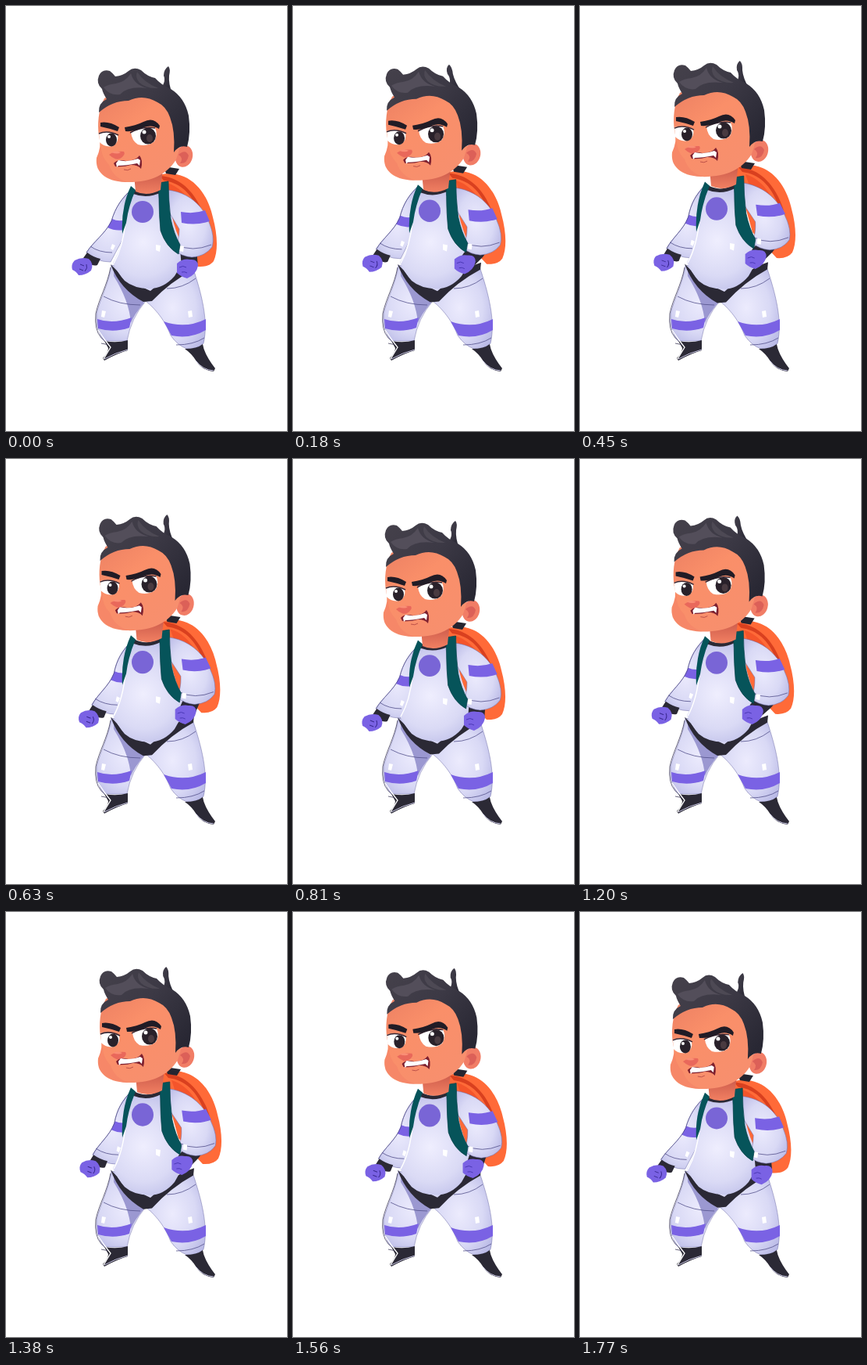
An HTML page that plays this animation: 360 by 543 pixels, repeating every 1.8 s.

```html
<!DOCTYPE html>
<html lang="en">
<head>
<meta charset="utf-8">
<title>Breathing astronaut</title>
<style>
  html, body { margin: 0; width: 100%; height: 100%; overflow: hidden; background: #fff; }
  svg { display: block; width: 100%; height: 100%; }
  .dark { fill: #2b2935; }
  .violet { fill: #7a62e4; }
  .suit { fill: url(#suit); stroke: #6b68a4; stroke-width: .5; }
  .belly { fill: url(#belly); }
  .teal { fill: #06545a; }
  .seam { fill: none; stroke: #55528c; stroke-width: .8; }
  .glint { fill: #fff; }
</style>
</head>
<body>
<svg viewBox="0 0 360 543">
  <defs>
    <radialGradient id="suit" cx=".45" cy=".5" r=".65">
      <stop offset="0" stop-color="#ecebfd"/><stop offset=".6" stop-color="#d9d9f5"/><stop offset="1" stop-color="#b9b9e6"/>
    </radialGradient>
    <radialGradient id="belly" gradientUnits="userSpaceOnUse" cx="176" cy="302" r="78">
      <stop offset="0" stop-color="#efeefe"/><stop offset=".55" stop-color="#dadaf5"/><stop offset="1" stop-color="#b6b7e5"/>
    </radialGradient>
    <linearGradient id="skin" x1="0" y1="0" x2=".7" y2="1">
      <stop offset="0" stop-color="#ea7e62"/><stop offset=".45" stop-color="#fa8f69"/><stop offset="1" stop-color="#f78f6e"/>
    </linearGradient>
    <linearGradient id="hair" x1="0" y1="0" x2="1" y2=".8">
      <stop offset="0" stop-color="#45414b"/><stop offset=".5" stop-color="#3c3945"/><stop offset="1" stop-color="#282733"/>
    </linearGradient>
    <linearGradient id="neck" x2="0" y2="1">
      <stop offset="0" stop-color="#bd4d43"/><stop offset="1" stop-color="#f28062"/>
    </linearGradient>
  </defs>

  <g id="pack">
    <path fill="#ff6a38" d="M192 218Q208 210 228 218C247 226 260 247 265 270C271 292 272 313 266 326Q260 334 246 333L215 300Z"/>
    <path fill="#d9401f" d="M197 217C222 218 244 237 255 272L249 268C239 240 224 226 202 223Z"/>
    <path fill="#f4552b" d="M206 226C224 231 238 248 246 270L222 272Z"/>
  </g>

  <!-- legs -->
  <path class="suit" d="M135 331C132 354 121 373 116 393Q114 414 126 428L155 428Q160 399 179 377L200 345Z"/>
  <path fill="#9b98d1" d="M138 337Q153 362 177 379Q165 393 160 405Q158 377 138 345Z"/>
  <path class="suit" d="M179 377C195 390 205 405 211 421Q220 434 232 438Q247 438 253 431C260 402 250 366 239 333Q207 343 179 377Z"/>
  <path class="violet" d="M117 400Q137 407 161 398L158 411Q138 418 118 412Z"/>
  <path class="violet" d="M202 403Q230 413 256 400L256 414Q236 426 212 421Z"/>
  <path class="seam" d="M125 371Q145 382 172 382M206 361Q226 361 243 348M218 433Q240 433 254 424"/>
  <path class="dark" d="M126 428Q142 431 156 427L156 440Q142 444 126 453L124 450Q131 443 131 437Z"/>
  <path class="dark" d="M229 438Q245 438 252 432Q254 445 268 463L266 467Q252 466 244 454Q238 444 229 438Z"/>
  <path fill="none" stroke="#cac8e5" d="M126 451Q140 443 156 439M243 453Q252 465 266 466"/>
  <path fill="none" stroke="#44405f" stroke-width=".8" d="M134 334C130 356 119 374 115 393Q113 414 122 424L132 433L122 431"/>
  <path fill="none" stroke="#fff" stroke-width="1.3" d="M118 414L127 427L134 436L125 451"/>
  <path class="glint" d="M123 389l5 1-2 8-4-1zM233 390l5-1 1 8-5 1z"/>

  <g id="armL">
    <path class="suit" d="M160 235C149 245 140 257 135 275C127 291 112 301 103 315Q115 327 134 327L151 295L166 250Z"/>
    <path class="violet" d="M136 272Q144 276 154 273L151 286Q140 288 130 283Z"/>
    <path class="seam" d="M160 235C149 245 140 257 135 275C127 291 112 301 103 315M108 307Q119 315 136 315"/>
    <path class="dark" d="M104 315Q112 321 121 323L117 331Q109 334 99 322Z"/>
    <path class="violet" d="M88 325Q97 320 106 323Q113 329 109 338Q102 344 93 344Q90 339 85 337Q83 330 88 325Z"/>
    <path fill="none" stroke="#38288f" d="M95 330l5 2M94 336l5 2M103 330q2 5-2 9"/>
    <path class="glint" d="M136 304l4 2-3 6-3-2z"/>
  </g>

  <g id="torso">
    <path class="dark" d="M134 330Q143 338 150 348L185 364L212 342Q225 333 241 328L240 337Q211 352 187 377L176 378Q146 362 134 330Z"/>
    <path class="belly" d="M160 236Q180 247 200 235Q211 240 213 270Q217 287 225 304Q229 326 216 345Q202 361 184 361Q164 361 152 351Q143 341 137 328Q149 308 151 277Q153 250 160 236Z"/>
    <path fill="none" stroke="#fff" stroke-width="1.4" d="M153 276Q150 308 138 329"/>
    <path class="dark" d="M163 234Q181 244 199 232L199 238Q181 247 163 240Z"/>
    <circle cx="175" cy="263" r="14" fill="#7965d6"/>
    <path class="glint" d="M192 305l6 1-1 8-5-2z"/>
    <path class="teal" d="M160 230L166 235Q157 255 154 277L149 291Q147 257 160 230Z"/>
  </g>

  <line id="cuff" stroke="#2b2935" stroke-width="21" stroke-linecap="round"/>
  <g id="armR">
    <path class="suit" d="M207 235C234 238 252 255 260 276Q268 295 264 308Q255 320 238 321Q225 320 216 312Q222 300 222 285L207 260Z"/>
    <path class="violet" d="M224 263Q241 266 255 261L261 275Q244 281 225 277Z"/>
    <path class="seam" d="M219 305Q238 315 263 305"/>
    <path class="glint" d="M223 306l5 1-1 7-5-1z"/>
  </g>
  <g id="handR">
    <path class="violet" d="M219 329Q227 322 236 324Q246 323 246 332Q244 343 232 348Q224 346 219 341Z"/>
    <path fill="none" stroke="#4b38b6" d="M222 334q5-3 9 0M225 340q4-1 7 1"/>
  </g>
  <path id="strap" class="teal" stroke="#034047" stroke-width=".7" d="M195 226L208 224Q208 248 211 272Q215 291 223 305L221 317Q205 308 198 287Q196 266 196 246Z"/>

  <g id="head">
    <path fill="#252530" d="M202 205L222 208L217 216L205 214Z"/>
    <path fill="url(#neck)" d="M164 216L202 202Q199 223 198 235Q181 244 166 237Z"/>
    <ellipse cx="228" cy="192" rx="11" ry="14" fill="#f17d66" transform="rotate(15 228 192)"/>
    <path fill="url(#skin)" d="M126 118C118 133 117 151 119 166Q123 180 116 194C114 211 126 224 153 225C184 226 206 216 218 196Q226 176 222 151Q217 120 187 106Q148 105 126 118Z"/>
    <path fill="#dc6058" d="M221 190Q230 182 234 191Q232 202 223 201Q228 194 221 190Z"/>
    <path fill="#e9705f" opacity=".25" d="M122 178Q121 192 132 203Q137 219 155 225Q128 224 117 207Q114 195 122 178Z"/>
    <path id="spike" fill="url(#hair)" d="M195 110Q206 97 202 89Q202 81 208 77Q211 80 209 89Q208 99 213 112Z"/>
    <path fill="url(#hair)" d="M119 136Q118 124 129 119Q124 111 123 106Q115 99 119 89Q123 80 133 83Q137 86 140 90Q150 89 157 83Q164 77 173 82Q181 90 191 92Q199 101 211 106Q229 117 234 140Q237 162 232 180Q222 177 215 187Q217 160 210 142Q205 128 194 123Q176 112 157 121Q136 121 119 136Z"/>
    <path fill="#534e5a" d="M125 104Q131 100 141 99Q153 97 160 86Q164 101 181 105Q156 102 146 113Q133 115 125 104Z"/>
    <path fill="#4d4954" d="M168 84Q177 98 195 105Q180 106 171 98Q165 91 168 84Z"/>

    <!-- eyes -->
    <path fill="#fff" d="M119 162Q131 158 143 164Q145 174 137 179Q126 181 120 174Z"/>
    <ellipse cx="135" cy="171" rx="7" ry="8.5" fill="#29212a"/>
    <path fill="#fff" d="M160 161Q175 152 191 156Q195 164 190 173Q182 180 169 177Q161 172 160 161Z"/>
    <ellipse cx="182" cy="166" rx="10" ry="10.5" fill="#29212a"/>
    <circle cx="177" cy="161" r="2.5" fill="#fff"/><circle cx="132" cy="167" r="2" fill="#fff"/>
    <ellipse cx="184" cy="169" rx="4" ry="5" fill="#493a40"/>
    <path fill="none" stroke="#392530" stroke-width="1.5" d="M119 163Q130 158 144 165M159 162Q175 153 191 156"/>
    <path fill="#211c26" d="M121 149Q132 147 145 155L143 160Q131 156 121 154ZM152 155Q166 153 176 148Q189 141 197 153L196 157Q187 151 177 155Q164 161 153 160Z"/>
    <path fill="#e9685b" d="M132 190Q139 185 151 186Q154 190 146 195Q141 198 132 190Z"/>
    <path fill="#fa8e75" d="M135 187Q141 184 147 187Q143 190 135 187Z"/>

    <g id="mouth">
      <path fill="#7e2130" d="M138 201Q143 195 154 198Q166 198 171 191Q176 197 173 208Q169 203 160 203Q151 206 140 205Z"/>
      <path fill="#fff" d="M141 201L144 197Q156 200 169 195L172 197L171 204L168 201Q154 204 144 204L142 206Z"/>
      <path fill="none" stroke="#bd5149" d="M151 209q5 2 9-1"/>
    </g>
  </g>
</svg>
<script>
  const PERIOD = 900;
  // phase, then: head x y, spike x, left hand x y, pack x y, right hand x y, mouth x y
  const poses = [
    [0,   0, 0, 0,    0, 0,   0, 0,    0, 0,    0, 0],
    [165, 1, -2, -9,  4, -4,  2, -3,   -12, -5, 2, -2],
    [465, 2, -7, -5,  10, -5, 6, -11,  -7, -12, 1, -3],
    [720, 1, -4, -2,  7, 2,   3, -6,   0, -6,   0, -1],
    [810, 0, 2, 0,    4, 4,   2, 0,    0, -1,   0, 0]
  ];
  const count = poses.length;
  const el = id => document.getElementById(id);
  const set = (id, value) => el(id).setAttribute("transform", value);
  const move = (id, x, y) => set(id, `translate(${x} ${y})`);
  const shear = (id, k, y0, dy) => set(id, `matrix(1 0 ${k} 1 ${-k * y0} ${dy})`);

  const key = (i, c) => {
    const wrap = Math.floor(i / count);
    const row = poses[i - wrap * count];
    return c ? row[c] : row[0] + wrap * PERIOD;
  };
  const slope = (i, c) => (key(i + 1, c) - key(i - 1, c)) / (key(i + 1, 0) - key(i - 1, 0));

  // Periodic cubic Hermite curve through the poses
  function sample(phase) {
    let i = count - 1;
    while (poses[i][0] > phase) i--;
    const span = key(i + 1, 0) - key(i, 0), u = (phase - key(i, 0)) / span, v = 1 - u;
    return poses[0].slice(1).map((_, n) => {
      const c = n + 1;
      return v * v * (1 + 2 * u) * key(i, c) + u * u * (3 - 2 * u) * key(i + 1, c)
        + span * u * v * (v * slope(i, c) - u * slope(i + 1, c));
    });
  }

  function draw(phase) {
    const [hx, hy, sx, lx, ly, px, py, rx, ry, mx, my] = sample(phase);
    const armX = px * 0.9, armY = py * 0.85;
    move("head", hx, hy);
    move("mouth", mx, my);
    shear("spike", -sx / 28, 105, 0);
    move("pack", px, py);
    shear("armL", lx / 93, 240, ly);
    shear("armR", armX / 80, 245, armY);
    move("handR", rx, ry);
    const stretch = 1 - hy * 0.75 / 107;
    set("torso", `matrix(1 0 0 ${stretch} 0 ${345 * (1 - stretch)})`);
    move("strap", px * 0.3, hy);
    const ends = { x1: 234 + armX, y1: 316 + armY, x2: 235 + rx * 0.7, y2: 328 + ry };
    for (const name in ends) el("cuff").setAttribute(name, ends[name]);
  }

  const start = performance.now();
  function tick() {
    const time = performance.now() - start;
    draw(Math.floor(time / 30) * 30 % PERIOD);
    requestAnimationFrame(tick);
  }
  tick();
</script>
</body>
</html>
```
